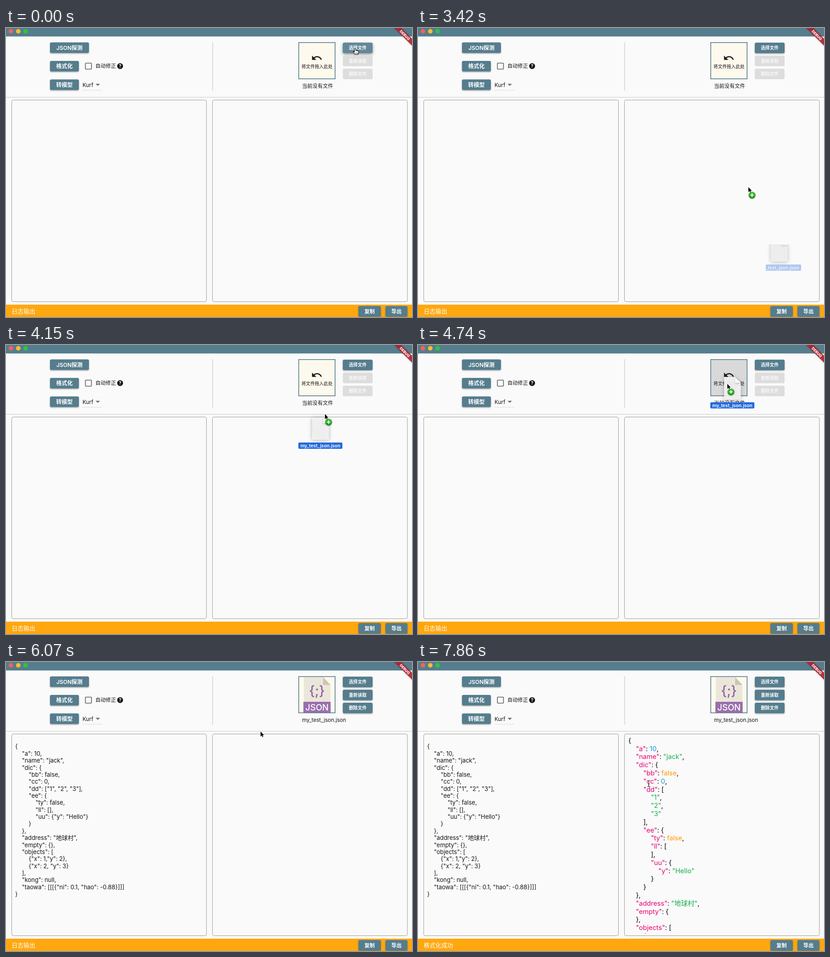
Animation, 886 px wide and 632 px high, one loop 8000 ms. Source, as an HTML page with a canvas:

```html
<!DOCTYPE html>
<html lang="zh">
<head>
<meta charset="utf-8">
<title>JSON</title>
<style>
html, body { margin: 0; width: 100%; height: 100%; overflow: hidden; background: #fafafa; }
canvas { display: block; }
</style>
</head>
<body>
<canvas id="stage" width="886" height="632"></canvas>
<script>
const c = document.getElementById('stage').getContext('2d');
const LOOP = 8000;
const FONT = 'Inter, "Noto Sans CJK SC", "Noto Sans CJK", sans-serif';
const TEAL = '#557d8d', INK = '#141414';
const FILE = 'my_test_json.json';

// Periods of change: start, end, number of evenly spaced steps
const RUNS = [[900, 1490, 5], [3420, 4440, 8], [4590, 4740, 2],
              [5040, 5620, 5], [5920, 6960, 8], [7110, 7860, 6]];

// Moments at which the state switches
const LEAVE = 1480, DRAG = 3420, OVER = 4430, DROP = 5040,
      NAMED = 5180, LOADED = 5610, PRESS = 7110, DONE = 7250;

const POINTER = [
  [0, 762, 45], [899, 762, 45], [900, 772, 62], [1045, 790, 170], [1190, 818, 300], [1335, 852, 430],
  [3420, 721, 348], [3710, 714, 270], [4149, 696, 151], [4440, 682, 105], [4740, 675, 85],
  [5040, 674, 78], [5475, 671, 67], [5620, 645, 84], [5920, 610, 110], [6220, 500, 195],
  [6515, 320, 235], [6810, 160, 130], [6960, 122.5, 82], [7110, 122.5, 82], [7260, 150, 112],
  [7410, 280, 195], [7560, 405, 250], [7710, 482, 266], [7860, 503.5, 266]
];
const CARRIED = [[3420, 788, 524], [3710, 742, 385], [4149, 686, 220], [4440, 696, 156], [4740, 686, 132]];

const RAW = `{
    "a": 10,
    "name": "jack",
    "dic": {
        "bb": false,
        "cc": 0,
        "dd": ["1", "2", "3"],
        "ee": {
            "ty": false,
            "ll": [],
            "uu": {"y": "Hello"}
        }
    },
    "address": "地球村",
    "empty": {},
    "objects": [
        {"x": 1,"y": 2},
        {"x": 2, "y": 3}
    ],
    "kong": null,
    "taowa": [[[{"ni": 0.1, "hao": -0.88}]]]
}`;

function pretty(v, pad = '') {
  if (v === null || typeof v !== 'object') return JSON.stringify(v);
  const list = Array.isArray(v), inner = pad + '    ';
  const rows = Object.entries(v).map(([k, x]) => inner + (list ? '' : `"${k}": `) + pretty(x, inner));
  return (list ? '[' : '{') + '\n' + (rows.length ? rows.join(',\n') + '\n' : '') + pad + (list ? ']' : '}');
}
const rawLines = RAW.split('\n');
const niceLines = pretty(JSON.parse(RAW)).split('\n').slice(0, 25);

const UNDO = new Path2D('M12.5 8c-2.65 0-5.05.99-6.9 2.6L2 7v9h9l-3.62-3.62c1.39-1.16 3.16-1.88 5.12-1.88 3.54 0 6.55 2.31 7.6 5.5l2.37-.78C21.08 11.03 17.15 8 12.5 8z');
const ARROW = new Path2D('M0 0V11L2.6 8.6 4.4 12.4 6 11.7 4.3 8H7.6Z');
const HAND = new Path2D('M-1.6 1.2C-1.6-.4 1.2-.4 1.4 1.2V4.6C4 4 5 4.6 5.4 5.2 7 5 7.6 6 7.6 7.4 7.6 10 6.4 11 6.2 13H-.4C-1 11.4-3 9.6-4 7.6-4.6 6.2-3 5.6-1.6 7.4Z');
const BEAM = new Path2D('M-3-6.5Q0-6.5 0-5 0-6.5 3-6.5M0-5V5M-3 6.5Q0 6.5 0 5 0 6.5 3 6.5M-1.5 1H1.5');

function snap(t) {
  const run = RUNS.filter(r => t >= r[0]).pop();
  if (!run) return 0;
  const [a, b, n] = run;
  const k = Math.min(n - 1, Math.floor((t - a) * (n - 1) / (b - a)));
  return a + k * (b - a) / (n - 1);
}

function along(keys, t) {
  const i = keys.findIndex(k => k[0] > t);
  if (i < 0) return keys[keys.length - 1].slice(1);
  const [t0, x0, y0] = keys[Math.max(0, i - 1)], [t1, x1, y1] = keys[i];
  const u = t1 > t0 ? (t - t0) / (t1 - t0) : 0;
  return [x0 + (x1 - x0) * u, y0 + (y1 - y0) * u];
}

const inside = (p, x, y, w, h) => p && p[0] >= x && p[0] <= x + w && p[1] >= y && p[1] <= y + h;

function rect(x, y, w, h, color) {
  c.fillStyle = color;
  c.fillRect(x, y, w, h);
}

function round(x, y, w, h, r) {
  c.beginPath();
  c.roundRect(x, y, w, h, r);
}

function disc(x, y, r, color) {
  c.fillStyle = color;
  c.beginPath();
  c.arc(x, y, r, 0, 7);
  c.fill();
}

function poly(color, ...p) {
  c.fillStyle = color;
  c.beginPath();
  for (let i = 0; i < p.length; i += 2) c.lineTo(p[i], p[i + 1]);
  c.fill();
}

// y is the optical middle of the line
function text(s, x, y, size, color = INK, weight = 400, align = 'left') {
  c.font = `${weight} ${size}px ${FONT}`;
  c.textAlign = align;
  c.fillStyle = color;
  c.fillText(s, x, y + size * .37);
}

function shadow(alpha, blur, dy) {
  c.shadowColor = `rgba(0,0,0,${alpha})`;
  c.shadowBlur = blur;
  c.shadowOffsetY = dy;
}

function button(label, x, y, w, h, size, p, off) {
  const hot = !off && inside(p, x, y, w, h);
  c.save();
  if (!off) shadow(hot ? .45 : .35, hot ? 6 : 3, hot ? 2.5 : 1.5);
  round(x, y, w, h, 3);
  c.fillStyle = off ? '#dddddd' : hot ? '#628898' : TEAL;
  c.fill();
  c.restore();
  text(label, x + w / 2, y + h / 2 + .3, size, off ? '#f7f7f7' : '#fff', 600, 'center');
}

function frameBox(x, y, w, h) {
  round(x, y, w, h, 3.5);
  c.strokeStyle = '#9c9c9c';
  c.lineWidth = 1;
  c.stroke();
}

function banner() {
  c.save();
  c.translate(886, 0);
  c.rotate(Math.PI / 4);
  shadow(.4, 3, 0);
  rect(-40, 16.7, 80, 10.6, 'rgba(180,36,48,.88)');
  c.shadowColor = 'transparent';
  text('DEBUG', 0, 22, 8, '#fff', 800, 'center');
  c.restore();
}

function tools(t, p) {
  button('JSON探测', 96, 31.5, 85, 23, 12, p);
  button('格式化', 96, 72, 63, 23, 12, p);
  if (t >= PRESS && t < DONE) {
    c.save();
    round(96, 72, 63, 23, 3);
    c.clip();
    disc(122, 83, 26, 'rgba(255,255,255,.18)');
    c.restore();
  }
  button('转模型', 96, 112.5, 63, 23, 12, p);

  round(173.3, 76.8, 13.2, 13.2, 1);
  c.strokeStyle = '#616161';
  c.lineWidth = 1.6;
  c.stroke();
  text('自动修正', 195, 83.3, 11.3);
  disc(249, 83.3, 6.4, '#111');
  text('?', 249, 83.5, 10, '#fff', 700, 'center');

  text('Kurf', 167, 124.5, 11.8);
  poly('#737373', 195.5, 122, 205, 122, 200.2, 126.8);
  rect(166, 135.5, 44, 1, '#dedede');
}

function jsonBadge() {
  poly('#ebe6da', 650, 33, 692, 33, 708, 50, 708, 111, 650, 111);
  poly('#cdc5b1', 692, 33, 708, 50, 692, 50);
  rect(649, 87, 59.5, 24, '#9a6fad');
  text('{;}', 678.5, 62, 29, '#8d62a4', 500, 'center');
  text('JSON', 678.7, 99.5, 18.5, '#fff', 500, 'center');
}

function dropZone(t, p) {
  const named = t >= NAMED;
  rect(638, 31, 81, 81, TEAL);
  rect(639.6, 32.6, 77.8, 77.8, t >= OVER && t < DROP ? '#d9d9d9' : '#fef9ed');
  if (!named) {
    c.save();
    c.translate(665.7, 53);
    c.scale(1.05, 1.05);
    c.fillStyle = '#1c1c1c';
    c.fill(UNDO);
    c.restore();
    text('将文件拖入此处', 678.7, 84, 9.7, INK, 400, 'center');
  } else if (t >= LOADED) {
    jsonBadge();
  }
  text(named ? FILE : '当前没有文件', 646, 126.5, named ? 11.55 : 11.3);
  button('选择文件', 735, 32, 65, 23, 9.7, p);
  button('重新读取', 735, 60.5, 65, 23, 9.7, p, !named);
  button('删除文件', 735, 89, 65, 23, 9.7, p, !named);
}

function rawText() {
  rawLines.forEach((s, i) => {
    const body = s.trimStart();
    text(body, 20 + (s.length - body.length) / 4 * 14.8, 184.7 + 15.36 * i, 12.9);
  });
}

function niceText() {
  const token = /("[^"]*")(?=:)|("[^"]*")|(-?\d[\d.]*)|(true|false|null)|./g;
  const tints = ['#e80070', '#12ae4a', '#1c92ee', '#ff9800'];
  c.save();
  c.beginPath();
  c.rect(452, 159, 423, 434.5);
  c.clip();
  niceLines.forEach((s, i) => {
    const body = s.trimStart();
    let x = 459 + (s.length - body.length) / 4 * 16.4;
    for (const m of body.matchAll(token)) {
      const kind = m.slice(1).findIndex(Boolean);
      text(m[0], x, 171.3 + 17.8 * i, 14.6, tints[kind] || '#000');
      x += c.measureText(m[0]).width;
    }
  });
  c.restore();
}

function carriedFile(t) {
  const [x, y] = along(CARRIED, t);
  const fresh = t < DRAG + 100;
  c.save();
  if (fresh) {
    c.beginPath();
    c.rect(759, 473, 80, 60);
    c.clip();
  }
  c.globalAlpha = fresh ? .85 : .92;
  c.save();
  shadow(.3, 8, 1);
  const l = x - 18, r = x + 18.5, top = y - 62, low = y - 13;
  poly('#f5f5f5', l, top, r - 13, top, r, top + 13, r, low, l, low);
  c.restore();
  poly('#eeeeee', l, top + 18, l + 36, low, l + 18, low, l, top + 33);
  c.save();
  shadow(.3, 3, 1);
  poly('#fdfdfd', r - 13, top, r, top + 13, r - 13, top + 13);
  c.restore();
  c.globalAlpha = fresh ? .35 : 1;
  round(x - 48, y - 6.8, 96, 13.6, 2);
  c.fillStyle = '#2269dc';
  c.fill();
  c.globalAlpha = fresh ? .8 : 1;
  text(FILE, x, y, 10.1, '#fff', 600, 'center');
  c.restore();
}

function plusBadge(x, y) {
  c.save();
  shadow(.35, 2, 1);
  const g = c.createLinearGradient(0, y - 8, 0, y + 8);
  g.addColorStop(0, '#4fbf3c');
  g.addColorStop(1, '#159417');
  disc(x, y, 7.6, g);
  c.restore();
  rect(x - 4, y - .9, 8, 1.8, '#fff');
  rect(x - .9, y - 4, 1.8, 8, '#fff');
}

function pointer(p, dragging) {
  const overButton = inside(p, 96, 72, 63, 23) || inside(p, 735, 32, 65, 23);
  const overField = inside(p, 12, 157, 426, 442) || inside(p, 450, 157, 426, 442);
  c.save();
  c.translate(...p);
  c.lineJoin = 'round';
  if (!dragging && overField) {
    c.strokeStyle = '#fff';
    c.lineWidth = 2.4;
    c.stroke(BEAM);
    c.strokeStyle = '#111';
    c.lineWidth = 1.1;
    c.stroke(BEAM);
  } else {
    const hand = !dragging && overButton;
    const shape = hand ? HAND : ARROW;
    c.strokeStyle = hand ? '#111' : '#fff';
    c.lineWidth = hand ? 1.2 : 1.6;
    c.fillStyle = hand ? '#fff' : '#000';
    if (hand) c.fill(shape);
    c.stroke(shape);
    if (!hand) c.fill(shape);
    if (hand) {
      c.lineWidth = .8;
      c.stroke(new Path2D('M1.2 9V11.5M3.2 9V11.5M5.1 9V11.5'));
    }
  }
  c.restore();
  if (dragging) plusBadge(p[0] + 8, p[1] + 17.5);
}

function draw(t) {
  const dragging = t >= DRAG && t < DROP;
  const p = t < LEAVE || t >= DRAG ? along(POINTER, t) : null;
  const hover = dragging ? null : p;

  rect(0, 0, 886, 632, '#fafafa');
  rect(0, 0, 886, 18.5, TEAL);
  ['#ff5f57', '#febc2e', '#28c840'].forEach((color, i) => disc(10.8 + 16 * i, 7.2, 4.9, color));

  tools(t, hover);
  rect(450.5, 31, 1, 106, '#c0c0c0');
  dropZone(t, hover);
  rect(0, 151, 886, 1, '#c9c9c9');

  frameBox(12.5, 157.5, 425, 441);
  frameBox(450.5, 157.5, 425.5, 441);
  if (t >= LOADED) rawText();
  if (t >= DONE) niceText();

  rect(0, 605, 886, 27, '#ffa70e');
  text(t >= DONE ? '格式化成功' : '日志输出', 12.5, 619.7, 12.8, '#fff', 500);
  button('复制', 769, 608, 49, 23, 11.3, hover);
  button('导出', 828, 608, 48, 23, 11.3, hover);
  banner();

  if (dragging) carriedFile(t);
  if (p) pointer(p, dragging);
}

const start = performance.now();
function tick() {
  draw(snap((performance.now() - start) % LOOP));
  requestAnimationFrame(tick);
}
tick();
</script>
</body>
</html>
```
